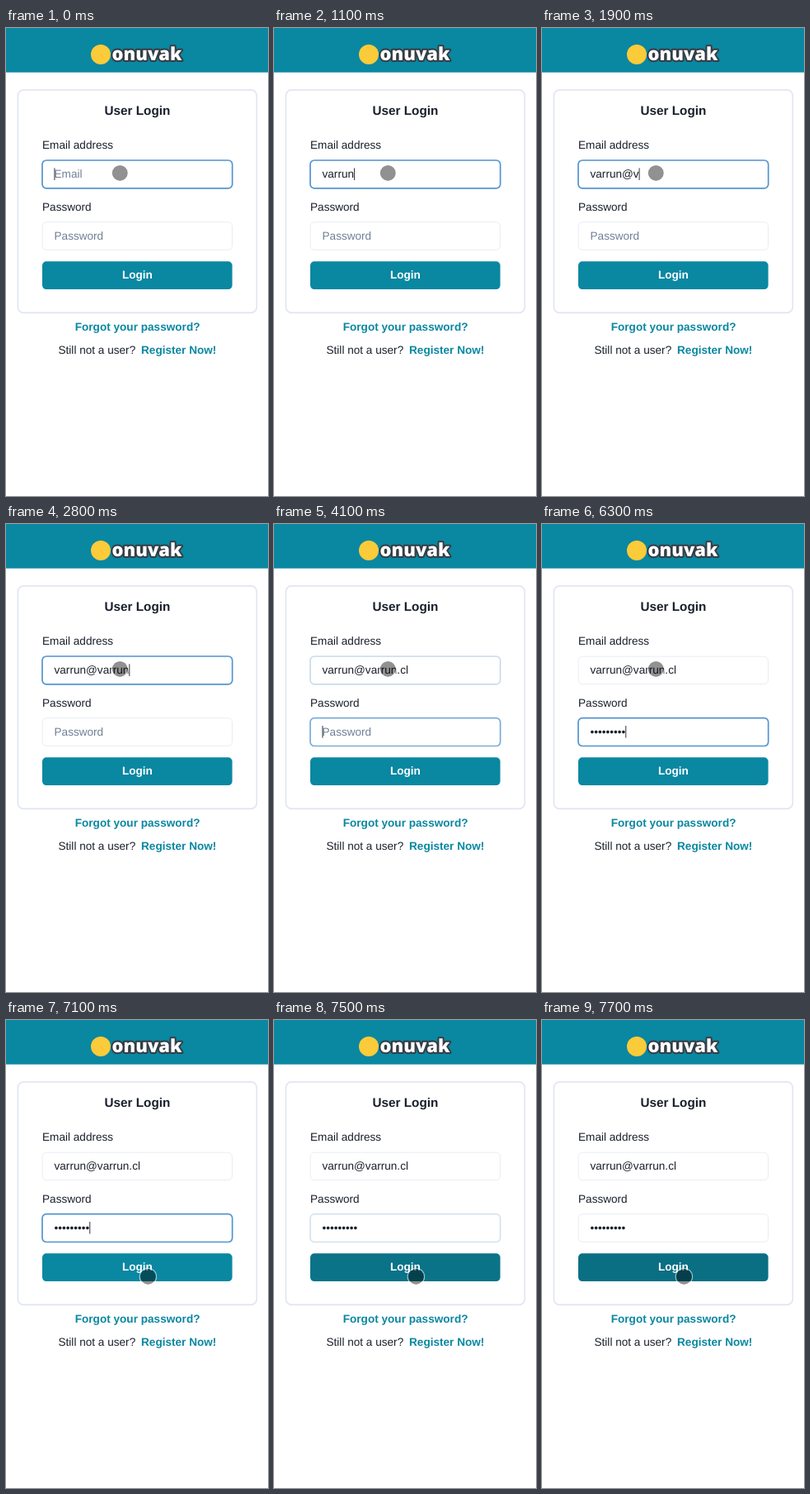
Animation, 318 px wide and 566 px high, one loop 8000 ms. Source, as an HTML page:

```html
<!DOCTYPE html>
<html lang="en">
<head>
<meta charset="utf-8">
<title>User Login</title>
<style>
  html, body { margin: 0; width: 100%; height: 100%; overflow: hidden; background: #fff; }
  svg { display: block; width: 318px; height: 566px; }
  text {
    font: 13.6px "Liberation Sans", Arial, sans-serif;
    fill: #1a202c;
    text-rendering: geometricPrecision;
  }
  .bold { font-weight: 700; }
  .mid { text-anchor: middle; }
  .title { font-size: 15.3px; }
  .link { fill: #0a87a1; }
  .light { fill: #fff; }
  .hint { fill: #718096; }
  .brand {
    font: 800 22px "Open Sans", sans-serif;
    fill: #fff;
    stroke: #343d46;
    stroke-width: 4px;
    stroke-linejoin: round;
    paint-order: stroke;
  }
  .card, .box, .focus { fill: none; }
  .card { stroke: #e2e6f3; stroke-width: 1.7px; }
  .box { stroke: #e6eaf1; stroke-width: .9px; }
  .focus { stroke: #5596d0; stroke-width: 1.7px; }
  .caret { fill: #1a202c; }
</style>
</head>
<body>
<svg viewBox="0 0 318 566">
  <rect width="318" height="53.7" fill="#0a87a1"/>
  <circle cx="115" cy="32" r="12" fill="#fbcb3a"/>
  <text class="brand mid" x="171" y="38.8">onuvak</text>

  <rect class="card" x="14.4" y="74.8" width="289.9" height="269.6" rx="7"/>
  <text class="bold mid title" x="159.4" y="105">User Login</text>
  <text x="44" y="146">Email address</text>
  <text x="44" y="221">Password</text>
  <g id="email" transform="translate(44 160)"></g>
  <g id="password" transform="translate(44 234.6)"></g>

  <rect id="button" x="44" y="282.2" width="230.6" height="33.9" rx="5"/>
  <text class="bold mid light" x="159.4" y="303">Login</text>
  <text class="bold mid link" x="159.6" y="366">Forgot your password?</text>
  <text x="63.5" y="394">Still not a user?</text>
  <text class="bold link" x="164" y="394">Register Now!</text>

  <g id="pointer">
    <circle r="9.5" fill="#000" fill-opacity=".43"/>
    <circle r="10.2" fill="none" stroke="#fff" stroke-width="1.1" stroke-opacity=".6"/>
  </g>
</svg>
<script>
  const LOOP = 8000, TICK = 100;  // the picture refreshes once per tick
  const KEY_GAP = 178, FADE = 300;
  const TAB = 3990, MOVE = 6810, CLICK = 7370;

  const byId = id => document.getElementById(id);
  const clamp = (v, max) => Math.min(Math.max(v, 0), max);
  const mix = (a, b, p) => a + (b - a) * p;
  const easeOut = (t, start) => 1 - (1 - clamp((t - start) / FADE, 1)) ** 3;

  // Each burst is [start, keys], typed at a steady pace.
  const typed = (bursts, t) => bursts.map(([start, keys]) =>
    keys.slice(0, clamp(Math.floor((t - start) / KEY_GAP) + 1, keys.length))).join("");

  function makeField(id, hint, bursts) {
    const root = byId(id);
    root.innerHTML = `
      <rect class="box" x=".2" y=".2" width="230.3" height="33.5" rx="5"/>
      <rect class="focus" width="230.7" height="33.9" rx="5"/>
      <text class="hint" x="14.5" y="21">${hint}</text>
      <text class="value" x="14.5" y="21"></text>
      <rect class="caret" y="9.4" width=".9" height="14.6"/>`;
    const [, ring, label, text, caret] = root.children;

    return (t, focus, active) => {
      const value = typed(bursts, t);
      text.textContent = value;
      label.style.display = value ? "none" : "";
      ring.style.opacity = focus;
      caret.style.display = active ? "" : "none";
      caret.setAttribute("x", 14.5 + (value ? text.getComputedTextLength() : 0));
    };
  }

  const drawEmail = makeField("email", "Email",
    [[200, "varrun"], [1700, "@varrun"], [3420, ".cl"]]);
  const drawPassword = makeField("password", "Password", [[4810, "•".repeat(9)]]);

  function draw(t) {
    const tab = easeOut(t, TAB), move = easeOut(t, MOVE), click = easeOut(t, CLICK);
    drawEmail(t, 1 - tab, !tab);
    drawPassword(t, tab - click, tab && !click);

    byId("pointer").setAttribute("transform",
      `translate(${mix(138.3, 172.4, move)} ${mix(175.4, 310.4, move)})`);
    byId("button").setAttribute("fill",
      `rgb(10, ${mix(135, 111, click)}, ${mix(161, 131, click)})`);
  }

  const begin = performance.now();
  function tick() {
    const t = (performance.now() - begin) % LOOP;
    draw(t - t % TICK);
    requestAnimationFrame(tick);
  }
  tick();
</script>
</body>
</html>
```
